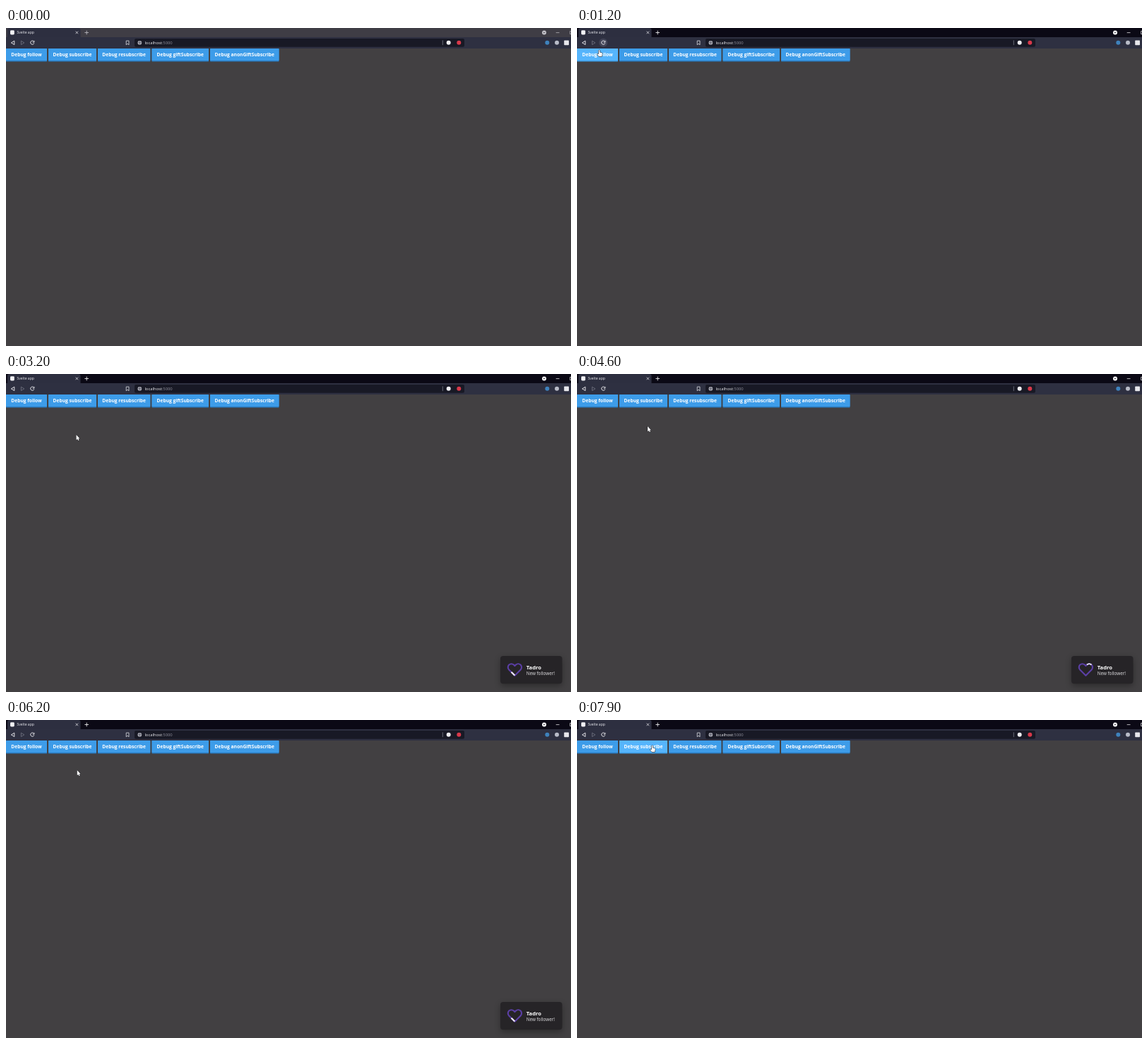
Recreate the animation shown at these times as an HTML page with a canvas. Size 800 by 450 pixels, loop 8 s.

```html
<!DOCTYPE html>
<html lang="en">
<head>
<meta charset="utf-8">
<title>Alert demo</title>
<style>
  html, body { margin: 0; width: 100%; height: 100%; overflow: hidden; background: #424042; }
  canvas { display: block; width: 800px; height: 450px; }
</style>
</head>
<body>
<canvas id="stage"></canvas>
<script>
const canvas = document.getElementById('stage');
const ctx = canvas.getContext('2d');
const dpr = window.devicePixelRatio || 1;
canvas.width = 800 * dpr;
canvas.height = 450 * dpr;

const LOOP = 8000, STEP = 100, FOCUS_AT = 800;
const FONT = '"Open Sans", "Noto Sans", sans-serif';
const BUTTONS = [
  ['Debug follow', 0, 58],
  ['Debug subscribe', 60, 68],
  ['Debug resubscribe', 130, 74.3],
  ['Debug giftSubscribe', 206.5, 80.5],
  ['Debug anonGiftSubscribe', 289, 97.5]
];

// Pointer stops: time, x, y
const TRAIL = [
  [500, 150, 198], [1000, 38, 22], [1200, 31.5, 31], [1800, 31.5, 31],
  [2100, 99, 86], [2200, 100, 87], [2700, 100, 87], [3200, 99.5, 86],
  [3500, 99.5, 85], [4300, 100, 76], [4600, 100, 74], [5300, 100.7, 71],
  [7000, 100.7, 71], [7200, 105, 37], [7300, 107, 20], [7400, 107, 20],
  [7600, 106.5, 36], [8000, 106.5, 36]
];

const HEART = new Path2D('M4.318 6.318a4.5 4.5 0 0 0 0 6.364L12 20.364l7.682-7.682a4.5 4.5 0 0 0-6.364-6.364L12 7.636l-1.318-1.318a4.5 4.5 0 0 0-6.364 0z');
const HEART_LEN = 53.73, DASH = 6.4;
const ARROW = new Path2D('M0 0V7.4L1.7 5.9L2.8 8.3L4 7.8L2.9 5.4H5Z');
const HAND = new Path2D('M-.8 .6Q0-.4 .8 .6V3.6L3.6 4.2Q4.4 4.5 4.3 5.4L3.6 9.3H-.5L-2.8 6.2Q-2.9 5.1-1.8 5.5L-.8 6.2Z');

const clamp = v => Math.max(0, Math.min(1, v));

function text(str, x, y, size, color, weight = 400) {
  ctx.font = `${weight} ${size}px ${FONT}`;
  ctx.fillStyle = color;
  ctx.fillText(str, x, y);
}

function rect(x, y, w, h, color, r = 0) {
  ctx.fillStyle = color;
  ctx.beginPath();
  ctx.roundRect(x, y, w, h, r);
  ctx.fill();
}

function disc(x, y, r, color) {
  ctx.fillStyle = color;
  ctx.beginPath();
  ctx.arc(x, y, r, 0, Math.PI * 2);
  ctx.fill();
}

function stroke(d, color, width = 0.8) {
  ctx.strokeStyle = color;
  ctx.lineWidth = width;
  ctx.stroke(new Path2D(d));
}

function pointerAt(t) {
  if (t < TRAIL[0][0]) return null;
  const i = Math.max(1, TRAIL.findIndex(p => p[0] >= t));
  const [t0, x0, y0] = TRAIL[i - 1], [t1, x1, y1] = TRAIL[i];
  const k = clamp((t - t0) / (t1 - t0));
  return { x: x0 + (x1 - x0) * k, y: y0 + (y1 - y0) * k };
}

function drawTabs(focused) {
  const ink = focused ? '#ffffff' : '#c4c3c9';
  rect(0, 0, 800, 14, focused ? '#0b0915' : '#3f3d45');
  rect(2, 0, 103.5, 14, '#2d2f40', [3, 3, 0, 0]);
  rect(6, 3.2, 5.8, 6.2, '#f1f1f4', 1.4);
  text('Svelte app', 15.4, 8.3, 5.1, '#e9e9ee');
  stroke('M98.6 4.7l3.5 3.5m0-3.5l-3.5 3.5', '#e6e6ea');
  stroke('M111.4 6.5h5.6M114.2 3.7v5.6', ink);
  disc(762, 6.4, 3, ink);
  stroke('M760.6 5.8l1.4 1.4l1.4-1.4', focused ? '#0b0915' : '#3f3d45', 0.9);
  stroke('M778.7 6.6h4.8', ink, 0.7);
  stroke('M800 4.4h-1.3v4.2h1.3', ink, 0.7);
}

function drawToolbar(reloadHover) {
  rect(0, 13, 800, 16, '#2e3041');
  if (reloadHover) disc(37.2, 20.8, 6, '#434557');
  stroke('M11.8 18.2v5.4L7.4 20.9Z', '#f2f2f5', 0.9);
  stroke('M21.4 18.2v5.4l4.4-2.7Z', '#747684', 0.8);
  stroke('M39.4 19.1A2.6 2.6 0 1 0 39.8 21.4M39.9 17.9v2.2h-2.2', '#f2f2f5', 0.9);
  stroke('M170.2 18.1h3.8v5.7l-1.9-1.6l-1.9 1.6Z', '#dcdde3', 0.8);

  rect(182, 15, 467, 11.8, '#181925', 2);
  disc(189.3, 20.8, 2.9, '#b2b3bc');
  stroke('M186.6 20.8h5.4M189.3 18v5.6', '#353644', 0.6);
  text('localhost', 196.4, 22.9, 5.83, '#f0f0f4');
  const hostWidth = ctx.measureText('localhost').width;
  text(':5000', 196.4 + hostWidth, 22.9, 5.83, '#92939f');
  stroke('M618.3 17.4v6.8', '#8a8b97', 0.7);
  disc(626.7, 20.8, 3, '#f0f0f3');
  disc(641.3, 20.8, 3, '#d8394a');
  disc(766.3, 20.8, 3, '#3e82bd');
  disc(780, 20.8, 3, '#b9bcc8');
  rect(790.2, 17.4, 6.8, 6.8, '#e7e7ec', 0.8);
}

function drawButtons(pointer) {
  ctx.textAlign = 'center';
  let over = false;
  for (const [label, x, w] of BUTTONS) {
    const hot = pointer && pointer.y >= 29 && pointer.y < 47.5 &&
      pointer.x >= x && pointer.x < x + w;
    over = over || hot;
    rect(x, 29, w, 18.4, hot ? '#3d9fe9' : '#2a7fc6', 0.7);
    rect(x, 29, w, 16.9, hot ? '#56b5fc' : '#3d9ce9', 0.7);
    text(label, x + w / 2, 40.2, 6.67, '#ffffff', 700);
  }
  ctx.textAlign = 'left';
  return over;
}

function drawHeart(t) {
  const p = ((t - 200) / 1000) % 1;
  const mid = 14.5 + HEART_LEN * p + 5 * Math.sin(2 * Math.PI * p);
  ctx.save();
  ctx.translate(720.4, 418.6);
  ctx.scale(1.07, 1.07);
  ctx.translate(-12, -12.85);
  ctx.lineWidth = 2;
  ctx.lineJoin = ctx.lineCap = 'round';
  ctx.strokeStyle = '#5b3fa5';
  ctx.stroke(HEART);
  ctx.lineCap = 'butt';
  ctx.setLineDash([DASH, HEART_LEN - DASH]);
  ctx.lineDashOffset = DASH / 2 - mid;
  ctx.strokeStyle = '#eeeaf6';
  ctx.stroke(HEART);
  ctx.restore();
}

function drawToast(t) {
  if (t < 1800 || t >= 6800) return;
  const enter = clamp((t - 1750) / 400);
  const leave = clamp((t - 6250) / 550);
  ctx.save();
  ctx.globalAlpha = enter * (1 - leave);
  ctx.translate(0, 50 * Math.pow(1 - enter, 3));
  ctx.shadowColor = 'rgba(0,0,0,.32)';
  ctx.shadowBlur = 9 * dpr;
  ctx.shadowOffsetY = 3 * dpr;
  rect(700, 399, 87.5, 39.3, '#262427', 4);
  ctx.shadowColor = 'transparent';
  drawHeart(t);
  text('Tadro', 736.8, 417.7, 7.6, '#ffffff', 700);
  text('New follower!', 736.8, 426.2, 6.3, '#e6e5e8');
  ctx.restore();
}

function drawPointer({ x, y }, hand) {
  const shape = hand ? HAND : ARROW;
  ctx.save();
  ctx.translate(x, y);
  ctx.lineJoin = 'round';
  ctx.lineWidth = 1;
  ctx.strokeStyle = '#18181c';
  ctx.stroke(shape);
  ctx.fillStyle = '#ffffff';
  ctx.fill(shape);
  ctx.restore();
}

function draw(t) {
  const pointer = pointerAt(t);
  ctx.setTransform(dpr, 0, 0, dpr, 0, 0);
  rect(0, 0, 800, 450, '#424042');
  drawTabs(t >= FOCUS_AT);
  drawToolbar(t >= 1000 && t < 1400);
  const over = drawButtons(pointer);
  drawToast(t);
  if (pointer) drawPointer(pointer, over);
}

const start = performance.now();
function tick() {
  const t = (performance.now() - start) % LOOP;
  draw(Math.floor(t / STEP) * STEP);
  requestAnimationFrame(tick);
}
tick();
</script>
</body>
</html>
```
